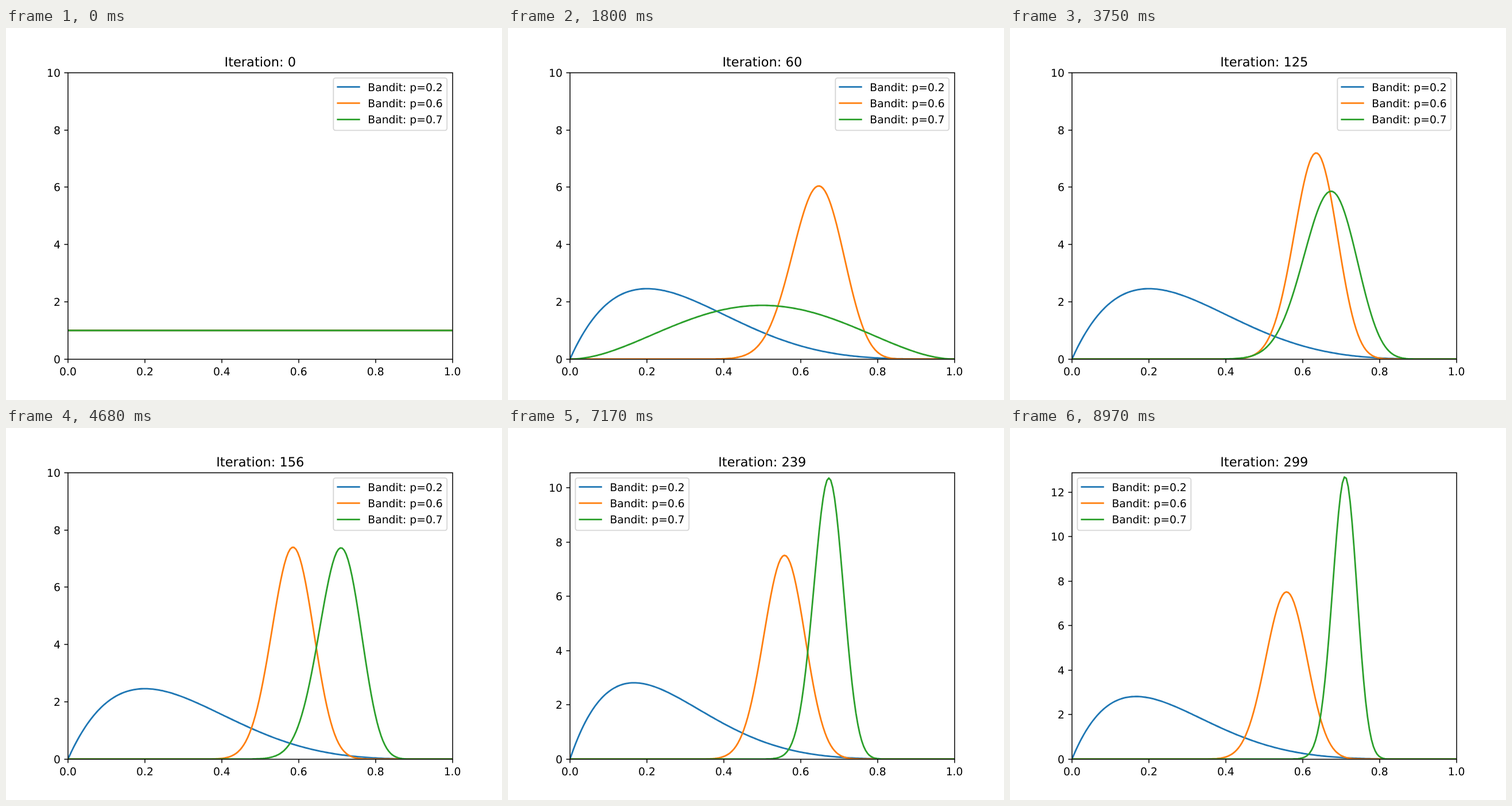
Recreate the animation shown at these times as an HTML page. Size 864 by 648 pixels, loop 9 s.

```html
<!DOCTYPE html>
<html lang="en">
<head>
<meta charset="utf-8">
<title>Bandit posteriors</title>
<style>
  html, body { margin: 0; width: 100%; height: 100%; overflow: hidden; background: #fff; }
  svg { display: block; width: 864px; height: 648px; }
  text { font-family: "DejaVu Sans", sans-serif; font-size: 18.75px; fill: #000; text-rendering: geometricPrecision; }
  .title { font-size: 22.5px; }
  .axis { fill: none; stroke: #000; stroke-width: 1.5; }
  .curve { fill: none; stroke-width: 2.8125; stroke-linecap: square; stroke-linejoin: round; }
</style>
</head>
<body>
<svg id="chart" viewBox="0 0 864 648"></svg>
<script>
const STEP_MS = 30, STEPS = 300, SAMPLES = 200;
const LEFT = 108, RIGHT = 777.6, TOP = 77.76, BOTTOM = 576.72;
const LEGEND = { width: 197.9, height: 91.2, gap: 9.375 };
const ARMS = [
  { p: 0.2, color: '#1f77b4' },
  { p: 0.6, color: '#ff7f0e' },
  { p: 0.7, color: '#2ca02c' }
];

// Wins and losses of each arm after a given number of pulls.
const MILESTONES = [
  [0, 0, 0, 0, 0, 0, 0],
  [16, 1, 4, 5, 3, 1, 2],
  [31, 1, 4, 14, 9, 1, 2],
  [62, 1, 4, 34, 19, 2, 2],
  [90, 1, 4, 40, 22, 15, 8],
  [125, 1, 4, 47, 27, 31, 15],
  [155, 1, 4, 48, 34, 48, 20],
  [187, 1, 5, 48, 37, 68, 28],
  [239, 1, 5, 48, 38, 99, 48],
  [299, 1, 5, 48, 38, 147, 60]
];

// One pull per step: always the outcome lagging furthest behind its milestone path.
function buildHistory() {
  const counts = [0, 0, 0, 0, 0, 0];
  const history = [counts.slice()];
  for (let m = 1; m < MILESTONES.length; m++) {
    const [from, ...a] = MILESTONES[m - 1];
    const [to, ...b] = MILESTONES[m];
    for (let i = from + 1; i <= to; i++) {
      const u = (i - from) / (to - from);
      const lag = counts.map((c, k) => a[k] + (b[k] - a[k]) * u - c);
      counts[lag.indexOf(Math.max(...lag))]++;
      history.push(counts.slice());
    }
  }
  return history;
}

function betaCurve(wins, losses) {
  let scale = wins + losses + 1;
  for (let k = 1; k <= losses; k++) scale *= (wins + k) / k;
  return Array.from({ length: SAMPLES }, (_, i) => {
    const x = i / (SAMPLES - 1);
    return scale * x ** wins * (1 - x) ** losses;
  });
}

function add(parent, tag, attrs = {}, text = '') {
  const node = document.createElementNS('http://www.w3.org/2000/svg', tag);
  for (const key in attrs) node.setAttribute(key, attrs[key]);
  node.textContent = text;
  parent.appendChild(node);
  return node;
}

const toX = x => LEFT + x * (RIGHT - LEFT);
const toY = (y, top) => BOTTOM - y / top * (BOTTOM - TOP);

const chart = document.getElementById('chart');
const clip = add(add(chart, 'defs'), 'clipPath', { id: 'plot' });
add(clip, 'rect', { x: LEFT, y: TOP, width: RIGHT - LEFT, height: BOTTOM - TOP });

const plot = add(chart, 'g', { 'clip-path': 'url(#plot)' });
const curves = ARMS.map(arm => add(plot, 'path', { class: 'curve', stroke: arm.color }));

for (let i = 0; i <= 5; i++) {
  const x = Math.round(toX(i / 5));
  add(chart, 'path', { class: 'axis', d: `M${x} 577v6.56` });
  add(chart, 'text', { x: toX(i / 5), y: 605, 'text-anchor': 'middle' }, (i / 5).toFixed(1));
}
const yTicks = [0, 2, 4, 6, 8, 10, 12].map(value => {
  const group = add(chart, 'g');
  add(group, 'path', { class: 'axis', d: 'M108 0h-6.56' });
  add(group, 'text', { x: 94.9, y: 7, 'text-anchor': 'end' }, value);
  return { value, group };
});
add(chart, 'rect', { class: 'axis', x: 108, y: 78, width: 670, height: 499 });
const title = add(chart, 'text', { class: 'title', x: 442.8, y: 66.8, 'text-anchor': 'middle' });

const legend = add(chart, 'g');
add(legend, 'rect', {
  width: LEGEND.width, height: LEGEND.height, rx: 3.75,
  fill: '#fff', stroke: '#ccc', 'stroke-width': 1.875, opacity: 0.8
});
ARMS.forEach((arm, i) => {
  const y = 15.4 + 28.4 * i;
  add(legend, 'path', { class: 'curve', stroke: arm.color, d: `M7.5 ${y}h37.5` });
  add(legend, 'text', { x: 60, y: y + 7 }, `Bandit: p=${arm.p}`);
});

const history = buildHistory();
const legendLeft = RIGHT - LEGEND.gap - LEGEND.width;
const legendBottom = TOP + LEGEND.gap + LEGEND.height;

function draw(step) {
  const counts = history[step];
  const densities = ARMS.map((_, k) => betaCurve(counts[2 * k], counts[2 * k + 1]));
  const top = Math.max(10, Math.max(...densities.flat()) + 0.2);
  let covered = false;

  densities.forEach((density, k) => {
    const points = density.map((value, i) => [toX(i / (SAMPLES - 1)), toY(value, top)]);
    covered = covered || points.some(([x, y]) => x > legendLeft && y < legendBottom);
    curves[k].setAttribute('d', 'M' + points.map(([x, y]) => x.toFixed(2) + ' ' + y.toFixed(2)).join('L'));
  });

  for (const { value, group } of yTicks) {
    group.setAttribute('transform', `translate(0 ${Math.round(toY(value, top))})`);
    group.setAttribute('visibility', value <= top ? 'visible' : 'hidden');
  }
  const x = covered ? LEFT + LEGEND.gap : legendLeft;
  legend.setAttribute('transform', `translate(${x} ${TOP + LEGEND.gap})`);
  title.textContent = `Iteration: ${step}`;
}

let start = null, shown = -1;
function tick(now) {
  if (start === null) start = now;
  const step = Math.floor(Math.max(0, now - start) / STEP_MS) % STEPS;
  if (step !== shown) draw(shown = step);
  requestAnimationFrame(tick);
}
draw(0);
requestAnimationFrame(tick);
</script>
</body>
</html>
```
